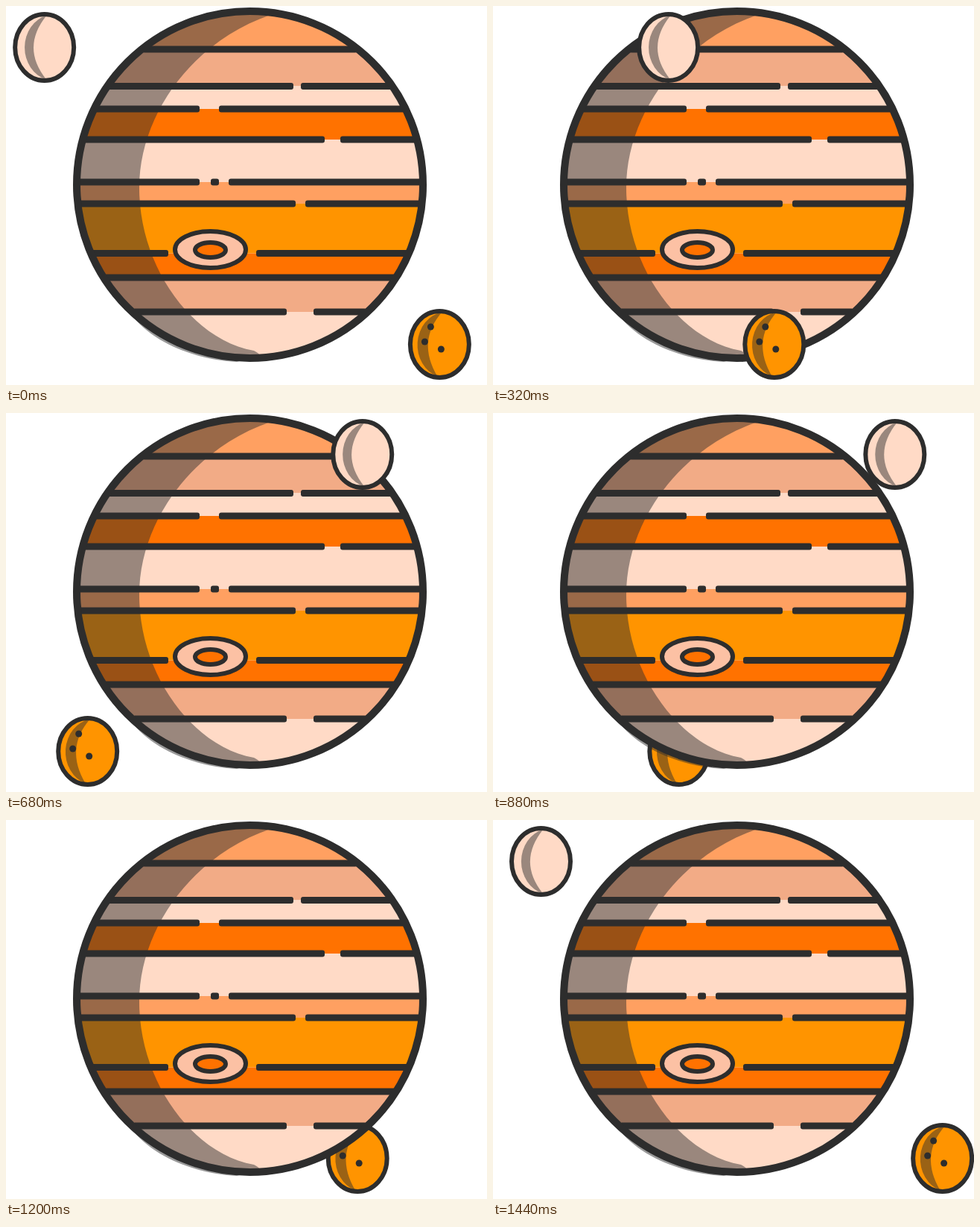
An HTML page that plays this animation: 646x508 px, repeating every 1.48 s.

```html
<!DOCTYPE html>
<html lang="en">
<head>
<meta charset="utf-8">
<title>Planet with two moons</title>
<style>
  html, body { margin: 0; width: 100%; height: 100%; overflow: hidden; background: #fff; }
  svg { display: block; width: 100vw; height: 100vh; }
  .line { fill: none; stroke: #2d2d2d; }
  .ink { fill: #2d2d2d; }
  .shade { fill: #2d2d2d; fill-opacity: .48; }
</style>
</head>
<body>
<svg viewBox="0 0 646 508">
  <defs>
    <clipPath id="disc"><circle cx="327.5" cy="239.5" r="234"/></clipPath>
  </defs>
  <g id="back"></g>
  <g id="planet">
    <g id="bands" clip-path="url(#disc)"></g>
    <path class="shade" d="M355 12C250 48 179 146 179 244C179 350 250 447 333 462Q339 465 341 468L310 477C259 474 199 455 166 411A234 234 0 0 1 355 7Z"/>
    <g id="bars" class="ink"></g>
    <circle class="line" cx="327.5" cy="239.5" r="232.5" stroke-width="10"/>
    <g class="line" stroke-width="6">
      <ellipse cx="274.5" cy="326.5" rx="47.5" ry="24.5" style="fill:#fcc1a4"/>
      <ellipse cx="274.5" cy="327" rx="20.5" ry="10" style="fill:#ff7200"/>
    </g>
  </g>
  <g id="front">
    <g id="pale">
      <ellipse rx="39.5" ry="44.5" fill="#ffdac6"/>
      <path class="shade" d="M3 -43Q-32 0 2.5 43A39.5 44.5 0 0 1 3 -43Z"/>
      <ellipse class="line" rx="39.5" ry="44.5" stroke-width="6"/>
    </g>
    <g id="amber">
      <ellipse rx="39.5" ry="44.5" fill="#ff9400"/>
      <path class="shade" d="M3 -43Q-31 -4 -3 43A39.5 44.5 0 0 1 3 -43Z"/>
      <ellipse class="line" rx="39.5" ry="44.5" stroke-width="6"/>
      <g class="ink">
        <circle cx="-12" cy="-23.5" r="4.5"/>
        <circle cx="-20" cy="-3.5" r="4.5"/>
        <circle cx="2" cy="6.5" r="4.5"/>
      </g>
    </g>
  </g>
</svg>
<script>
(() => {
  const LOOP = 1480, CX = 327.5, CY = 239.5, R = 232;
  const byId = id => document.getElementById(id);

  function addRect(parent, attrs) {
    const el = document.createElementNS('http://www.w3.org/2000/svg', 'rect');
    for (const key in attrs) el.setAttribute(key, attrs[key]);
    parent.appendChild(el);
  }

  // Each band: fill, lower edge, then the gaps in the bar drawn along that edge
  const bands = [
    ['#ffa061', 58],
    ['#f2ab86', 107.5, 386, 396],
    ['#ffdac6', 138, 260, 286],
    ['#ff7200', 179, 428, 449],
    ['#ffdac6', 236, 260, 275, 286, 299],
    ['#ffa061', 265, 389, 402],
    ['#ff9400', 331.5, 218, 336],
    ['#ff7200', 364],
    ['#f2ab86', 410, 377, 413],
    ['#ffdac6', 480]
  ];
  let edge = 0;
  for (const [fill, y, ...gaps] of bands) {
    addRect(byId('bands'), { x: 90, y: edge, width: 476, height: y - edge, fill });
    edge = y;
    const half = Math.sqrt(Math.max(0, R * R - (y - CY) ** 2));
    const ends = [CX - half, ...gaps, CX + half];
    for (let i = 0; half && i < ends.length; i += 2) {
      addRect(byId('bars'), { x: ends[i], y: y - 4.5, width: ends[i + 1] - ends[i], height: 9, rx: 3 });
    }
  }

  // Each moon crosses in front, turns, and returns behind: points of [time, x]
  const moons = [
    {
      el: byId('pale'), y: 55.5,
      over: [[-15, 42.5], [320, 235], [520, 380], [840, 572.5]],
      behind: [[840, 572.5], [1200, 284], [1465, 42.5]]
    },
    {
      el: byId('amber'), y: 453.5,
      over: [[-60, 614], [0, 583], [320, 378.5], [520, 226], [680, 109]],
      behind: [[680, 109], [1200, 471.5], [1420, 614]]
    }
  ];

  // Smooth curve through the points of one crossing
  function along(pts, t) {
    const last = pts.length - 1;
    let i = 0;
    while (i < last - 1 && t > pts[i + 1][0]) i++;
    const slope = k => {
      const a = pts[Math.max(k - 1, 0)], b = pts[Math.min(k + 1, last)];
      return (b[1] - a[1]) / (b[0] - a[0]);
    };
    const [t0, x0] = pts[i], [t1, x1] = pts[i + 1];
    const h = t1 - t0, u = (t - t0) / h, v = 1 - u;
    return v * v * (1 + 2 * u) * x0 + u * u * (3 - 2 * u) * x1
      + h * u * v * (v * slope(i) - u * slope(i + 1));
  }

  function draw(ms) {
    const time = ms % LOOP;
    for (const { el, y, over, behind } of moons) {
      const t = time >= LOOP + over[0][0] ? time - LOOP : time;
      const near = t < behind[0][0];
      const layer = byId(near ? 'front' : 'back');
      if (el.parentNode !== layer) layer.appendChild(el);
      const x = along(near ? over : behind, t);
      el.setAttribute('transform', `translate(${x.toFixed(2)} ${y})`);
    }
  }

  const start = performance.now();
  function tick() {
    draw(performance.now() - start);
    requestAnimationFrame(tick);
  }
  tick();
})();
</script>
</body>
</html>
```
